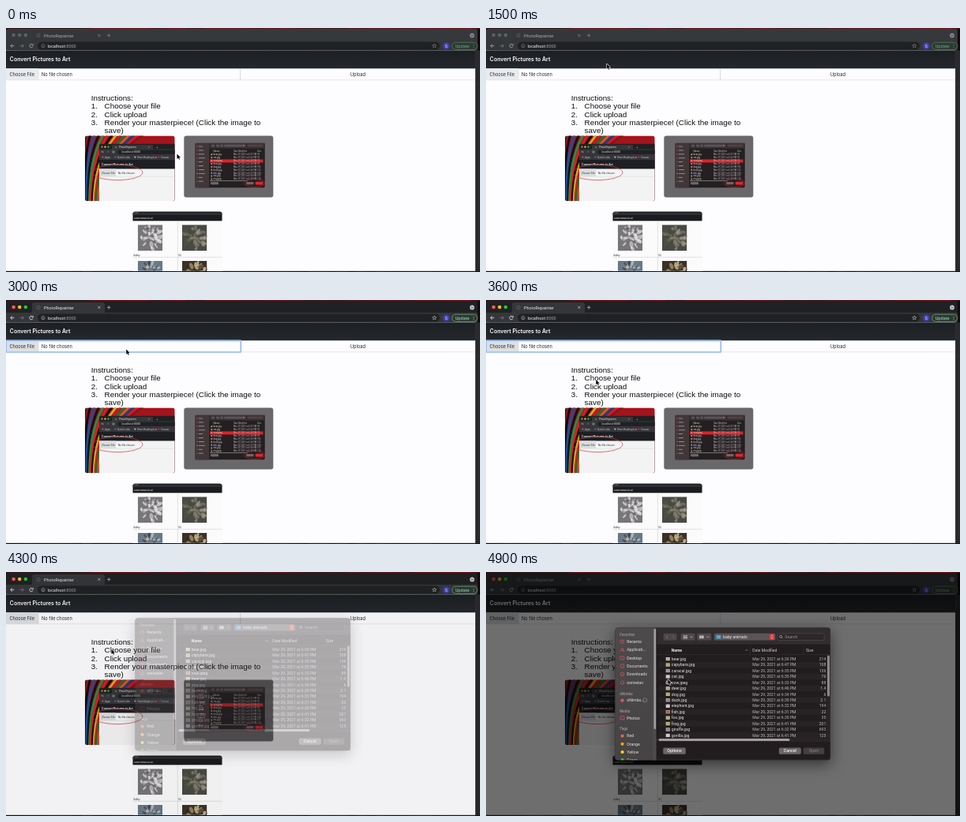
Animation of 600 by 309 pixels, one loop 5 s. Source, as an HTML page with a canvas:

```html
<!DOCTYPE html>
<html lang="en">
<head>
<meta charset="utf-8">
<title>Convert Pictures to Art</title>
<style>
html, body { margin: 0; width: 100%; height: 100%; overflow: hidden; background: #111; }
canvas { display: block; width: 600px; height: 309px; }
</style>
</head>
<body>
<canvas id="stage"></canvas>
<script>
const W = 600, H = 309, LOOP = 5000, STEP = 100;
const dpr = window.devicePixelRatio || 1;
const UI = 'Roboto, sans-serif', FORM = 'Inter, sans-serif';
const BODY = '"Liberation Sans", Arial, sans-serif';
const APP = 'PhotoRepainter';

function setup(canvas) {
  canvas.width = W * dpr;
  canvas.height = H * dpr;
  const c = canvas.getContext('2d');
  c.scale(dpr, dpr);
  return c;
}
const stage = document.getElementById('stage');
const screen = setup(stage);
const sheet = document.createElement('canvas');
const sheetCtx = setup(sheet);
let g = screen;

const lerp = (a, b, p) => a + (b - a) * p;
const smooth = p => p * p * (3 - 2 * p);

function rect(x, y, w, h, color) {
  g.fillStyle = color;
  g.fillRect(x, y, w, h);
}
function round(x, y, w, h, r, fill, stroke, lw = 0.6) {
  g.beginPath();
  g.roundRect(x, y, w, h, r);
  if (fill) { g.fillStyle = fill; g.fill(); }
  if (stroke) { g.strokeStyle = stroke; g.lineWidth = lw; g.stroke(); }
}
function disc(x, y, r, fill) {
  g.beginPath();
  g.arc(x, y, r, 0, 7);
  g.fillStyle = fill;
  g.fill();
}
function oval(x, y, rx, ry, color, lw = 0.6) {
  g.beginPath();
  g.ellipse(x, y, rx, ry, 0, 0, 7);
  g.strokeStyle = color;
  g.lineWidth = lw;
  g.stroke();
}
function line(color, lw, ...p) {
  g.beginPath();
  g.moveTo(p[0], p[1]);
  for (let i = 2; i < p.length; i += 2) g.lineTo(p[i], p[i + 1]);
  g.strokeStyle = color;
  g.lineWidth = lw;
  g.stroke();
}
function text(s, x, y, size, color, font = UI, weight = 400, align = 'left') {
  g.font = `${weight} ${size}px ${font}`;
  g.textAlign = align;
  g.fillStyle = color;
  g.fillText(s, x, y);
}
function clipped(x, y, w, h, r, draw) {
  g.save();
  g.beginPath();
  g.roundRect(x, y, w, h, r);
  g.clip();
  draw();
  g.restore();
}
function random(seed) {
  return () => (seed = (seed * 16807) % 2147483647) / 2147483647;
}
function gradient(y0, y1, a, b) {
  const f = g.createLinearGradient(0, y0, 0, y1);
  f.addColorStop(0, a);
  f.addColorStop(1, b);
  return f;
}

function desktopEdge() {
  rect(0, 0, W, H, '#17090b');
  const rnd = random(31);
  for (let x = 0; x < W; x += 12) {
    rect(x, 0, 12, 1.2, x < 90 ? '#32191c' : `rgb(${70 + rnd() * 50 | 0},24,30)`);
    rect(x, 308, 12, 1, `rgb(${25 + rnd() * 55 | 0},9,13)`);
  }
}

function browserBar(active, lit) {
  const ink = active ? '#e8eaed' : '#a4a7ab';
  const dim = active ? '#c4c7ca' : '#85888c';
  round(0, 1, 597, 20, 3, active ? '#202124' : '#36393c');
  rect(0, 16, 597, 12.6, '#35363a');
  round(33, 3, 92, 14, [3, 3, 0, 0], '#35363a');
  const lights = lit ? ['#fe5f57', '#febc2e', '#28c840'] : ['#5d6063', '#5d6063', '#5d6063'];
  lights.forEach((c, i) => disc(9.6 + i * 7.6, 9.1, 2.25, c));

  oval(41, 9.5, 2, 2, '#6d7074', 0.7);
  text(APP, 48, 11.5, 5.5, ink);
  line(dim, 0.7, 116.3, 7.8, 119.5, 11);
  line(dim, 0.7, 119.5, 7.8, 116.3, 11);
  line(dim, 0.7, 128, 9.4, 132.4, 9.4);
  line(dim, 0.7, 130.2, 7.2, 130.2, 11.6);
  disc(590, 9.5, 2.9, dim);
  line('#202124', 0.8, 588.6, 9, 590, 10.4, 591.4, 9);

  line(ink, 0.8, 10.5, 22.6, 5.8, 22.6);
  line(ink, 0.8, 8.1, 20.2, 5.7, 22.6, 8.1, 25);
  line('#777a7e', 0.8, 17.5, 22.6, 22.2, 22.6);
  line('#777a7e', 0.8, 19.9, 20.2, 22.3, 22.6, 19.9, 25);
  g.beginPath();
  g.arc(32, 22.6, 2.2, 0.3, 5.4);
  g.strokeStyle = ink;
  g.lineWidth = 0.8;
  g.stroke();
  line(ink, 0.8, 34.3, 19.9, 34.3, 21.8, 32.3, 21.8);

  round(40, 17.6, 509, 10, 5, '#202124');
  oval(47, 22.6, 2.1, 2.1, dim, 0.6);
  line(dim, 0.6, 47, 22.3, 47, 23.9);
  text('localhost', 52.5, 24.6, 5.5, '#f1f3f4');
  text(':8000', 52.5 + g.measureText('localhost').width, 24.6, 5.5, '#a2a6aa');
  g.beginPath();
  for (let i = 0; i < 10; i++) {
    const a = -Math.PI / 2 + i * Math.PI / 5, r = i % 2 ? 1.2 : 2.7;
    g.lineTo(542.3 + r * Math.cos(a), 22.6 + r * Math.sin(a));
  }
  g.closePath();
  g.strokeStyle = dim;
  g.lineWidth = 0.6;
  g.stroke();
  disc(557.3, 22.6, 4.3, '#3d42ae');
  text('S', 557.3, 24.5, 5.2, '#eef', UI, 400, 'center');
  const green = active ? '#7fcb96' : '#5c9a70';
  round(564.7, 18.2, 32, 9.2, 4.6, '#2d3833', green, 0.6);
  text('Update', 568.7, 24.7, 5.6, green, UI, 500);
  for (let i = -1; i < 2; i++) disc(592, 22.8 + i * 1.9, 0.5, green);
}

function wallpaper(x, y) {
  rect(x, y, 114, 83, '#a5141c');
  const paint = ['#0c0f12', '#15321f', '#0b0d10', '#1f4f9c', '#101214', '#2c8a45', '#d8211f', '#0f1113',
    '#d9a422', '#c8181f', '#23703c', '#e0561f', '#1d3f86', '#cf1c22', '#8e1219'];
  g.lineCap = 'round';
  paint.forEach((color, i) => {
    g.beginPath();
    g.moveTo(x - 4 + i * 1.9, y + 88);
    g.bezierCurveTo(x - 3 + i * 1.8, y + 55, x - 8 + i * 3, y + 25, x - 4 + i * 6, y - 6);
    g.strokeStyle = color;
    g.lineWidth = 3;
    g.stroke();
  });
  g.lineCap = 'butt';
}

function chooseShot() {
  clipped(100, 136.4, 113.5, 82.6, 3, () => {
    wallpaper(100, 136.4);
    round(118, 146.8, 110, 80, [2, 0, 0, 0], '#202124');
    ['#fe5f57', '#febc2e', '#28c840'].forEach((c, i) => disc(121.5 + i * 4, 150.6, 1.2, c));
    rect(134, 148, 52, 6, '#35363a');
    rect(118, 153.5, 100, 13.5, '#35363a');
    disc(139, 151, 1, '#777');
    text(APP, 143, 152.2, 3.2, '#ddd');
    text('×', 180, 152.2, 4, '#bbb');
    text('+', 190, 152.2, 4, '#bbb');
    line('#ddd', 0.5, 124, 157, 120.8, 157, 122, 155.8);
    line('#888', 0.5, 127, 157, 130.2, 157, 129, 155.8);
    oval(136, 157, 1.2, 1.2, '#ddd', 0.5);
    round(141, 154.4, 90, 5.4, 2.7, '#202124');
    text('localhost:8000', 146.5, 158.4, 3.6, '#ddd');
    [['Apps', 125], ['Quick Links', 141], ['Short Reading List', 166], ['Canvas', 196]].forEach(([s, x], i) => {
      disc(x - 2.6, 163.6, 1, ['#c66', '#48c', '#ccc', '#c33'][i]);
      text(s, x, 164.8, 3.1, '#c8c8c8');
    });
    rect(118, 167, 100, 11.4, '#1d1f22');
    text('Convert Pictures to Art', 121, 174.4, 3.6, '#fff', FORM, 600);
    rect(118, 178.4, 100, 45, '#f4f3f4');
    rect(118, 178.4, 21, 9.6, '#dcdee1');
    text('Choose File', 120.7, 184.5, 3.1, '#222', FORM);
    text('No file chosen', 142, 184.5, 3, '#222', FORM);
    line('#c9cdd1', 0.4, 118, 188.2, 214, 188.2);
    oval(141, 183, 32, 9.6, '#d8343a', 0.7);
  });
}

function pickShot() {
  clipped(225.3, 136.4, 113, 78, 3, () => {
    rect(225, 136, 114, 79, '#69676a');
    round(239, 145.6, 89, 57, 2, '#241f21', '#8a8789', 0.4);
    round(239.2, 145.8, 18, 56.6, [2, 0, 0, 2], '#413739');
    rect(257.2, 145.8, 70.6, 6.8, '#383133');
    round(276, 147.4, 27, 3, 1, '#5a5355');
    round(306, 147.4, 19, 3, 1, '#4a4345');
    disc(301, 148.9, 1.2, '#d23a40');
    [260, 266, 271].forEach(x => round(x, 147.4, 4, 3, 1, '#5a5355'));
    for (let i = 0; i < 10; i++) {
      disc(242, 150 + i * 4.9, 0.7, i === 7 ? '#e79a2d' : '#d5474c');
      rect(244, 149.6 + i * 4.9, 5 + i * 5 % 4, 0.8, '#a69fa1');
    }
    rect(258, 166.4, 67.5, 4, '#e02128');
    ['Name', 'bear.jpg', 'cat.jpg', 'cow.jpeg', 'deer.jpg', 'dog.jpg', 'duck.jpg', 'fish.jpg', 'fox.jpg', 'frog.jpg'].forEach((s, i) => {
      const y = 157.2 + i * 3.9;
      if (i) rect(259.5, y - 2, 1.6, 2.2, '#ad9c83');
      text(s, 262.5, y, 2.9, '#dedadb');
      text(i ? 'Mar 29, 2021 at 6:3' + i + ' PM' : 'Date Modified', 288, y, 2.7, '#b9b4b6');
      text(i ? 21 + i * 17 : 'Size', 318, y, 2.7, '#b9b4b6');
    });
    rect(258, 193, 48, 0.8, '#8c8789');
    round(259, 195, 10, 3.2, 1, '#6d6769');
    round(304, 195, 9.5, 3.2, 1, '#6d6769');
    round(315.6, 194.8, 9.8, 3.6, 1, '#e0262d');
    oval(314.5, 196.5, 13, 4.8, '#d02329', 0.6);
  });
}

// dark rim, light subject, blotchy paint strokes
function picture(x, y, w, h, rim, tones, seed) {
  clipped(x, y, w, h, 0, () => {
    rect(x, y, w, h, rim);
    const rnd = random(seed);
    g.globalAlpha = 0.75;
    for (let i = 0; i < 55; i++) {
      const a = rnd() * 7, d = Math.sqrt(rnd()) * 0.46;
      g.beginPath();
      g.ellipse(x + w / 2 + d * w * Math.cos(a), y + h / 2 + d * h * Math.sin(a),
        1 + rnd() * 3.2, 0.8 + rnd() * 1.6, a, 0, 7);
      g.fillStyle = tones[i % tones.length];
      g.fill();
    }
    g.globalAlpha = 1;
  });
}

function resultShot() {
  clipped(160.5, 232.5, 113, 75.3, [3, 3, 0, 0], () => {
    rect(160, 232, 114, 80, '#fbfbfc');
    rect(160, 232, 114, 12.3, '#1b1c1f');
    rect(160, 234.4, 114, 2, '#37383c');
    [163, 165, 167].forEach((x, i) => disc(x, 233.8, 0.6, ['#d55', '#cb4', '#4b5'][i]));
    text('Convert Pictures to Art', 162, 241.9, 2.2, '#ddd', FORM, 600);
    line('#c4c7ca', 0.5, 217.3, 244, 217.3, 309);
    line('#c4c7ca', 0.5, 160, 290.3, 274, 290.3);
    picture(166.8, 249.2, 31.4, 33, '#77757a', ['#e2e0e0', '#c9c7c7', '#69676a', '#f0eeee', '#a9a7a8'], 7);
    picture(223, 249.2, 31.4, 33, '#474a42', ['#8d8471', '#6b6f55', '#a39a8d', '#4d5348', '#77726f'], 19);
    text('Gallery', 161.5, 288.9, 2.6, '#222');
    text('Oil', 218.3, 288.9, 2.6, '#222');
    picture(166.8, 295, 31.4, 33, '#65798a', ['#c3ccd3', '#38424c', '#7b93a4', '#8b7a72'], 23);
    picture(223, 295, 31.4, 33, '#3a3127', ['#b59a68', '#2a2621', '#dac9a2', '#6b5640'], 41);
  });
}

function page(active, ring) {
  rect(0, 28.5, 594.3, 279.3, '#fdfcfe');
  rect(594.3, 28.5, 5.7, 279.3, '#292a2c');
  rect(0, 28.5, 594.3, 22.8, gradient(28.5, 51, '#1c1f23', '#24282c'));
  text('Convert Pictures to Art', 4.8, 41.8, 6.95, '#fff', FORM, 600);

  rect(0, 51.3, 41, 14.4, active ? '#dde0e3' : '#e9ecef');
  line('#ced4da', 0.5, 0, 65.8, 594, 65.8);
  line('#bfc4c9', 0.6, 296.6, 51.3, 296.6, 65.8);
  line('#d5d9dd', 0.5, 41.2, 51.3, 41.2, 65.8);
  text('Choose File', 4.5, 60.8, 5.65, '#212529', FORM);
  text('No file chosen', 45, 60.8, 5.7, '#212529', FORM);
  text('Upload', 445.3, 60.8, 5.7, '#212529', FORM, 400, 'center');
  if (ring === 1) {
    round(0.3, 51.6, 297, 14.4, 0.5, null, '#c1d8fb', 2);
    round(0.3, 51.6, 297, 14.4, 0.5, null, '#86b0ee', 0.8);
  } else if (ring) {
    line('#7ea6df', 0.9, 0, 65.8, 298, 65.8);
    line('#a9c6f0', 0.6, 297, 51.5, 297, 65.8);
  }

  const say = (s, x, row) => text(s, x, 92.4 + row * 10.05, 9.85, '#111', BODY);
  say('Instructions:', 107.7, 0);
  ['Choose your file', 'Click upload', 'Render your masterpiece! (Click the image to'].forEach((s, i) => {
    say(i + 1 + '.', 107.7, i + 1);
    say(s, 124.6, i + 1);
  });
  say('save)', 124.6, 4);
  chooseShot();
  pickShot();
  resultShot();
}

function sidebar() {
  const icon = '#e2555b', heads = '#9c9698', ink = '#e6e2e3';
  rect(163, 70, 53, 169, gradient(70, 238, '#4d4a4b', '#464344'));
  [['Favorites', 80.8], ['oNimbu', 156.2], ['Media', 178.3], ['Tags', 200]].forEach(([s, y]) =>
    text(s, 169.2, y, 4.7, heads, UI, 500));
  ['Recents', 'Applicati…', 'Desktop', 'Documents', 'Downloads', 'sorivelan'].forEach((s, i) => {
    const y = 88.2 + i * 10.3;
    if (i === 2) round(170, y - 1.8, 5, 3.6, 0.6, null, icon, 0.7);
    else if (i === 3) round(170.8, y - 2.3, 3.6, 4.6, 0.5, null, icon, 0.7);
    else if (i === 1) line(icon, 0.7, 170, y + 2, 172.5, y - 2.4, 175, y + 2, 171, y + 0.6);
    else if (i === 5) line(icon, 0.7, 170, y, 172.5, y - 2.3, 175, y, 174.2, y, 174.2, y + 2.3, 170.8, y + 2.3, 170.8, y);
    else oval(172.5, y, 2.3, 2.3, icon, 0.7);
    if (i === 0) line(icon, 0.6, 172.5, y - 1.4, 172.5, y, 173.6, y);
    if (i === 4) line(icon, 0.6, 171.5, y, 172.5, y + 1, 173.5, y);
    text(s, 178.2, y + 1.8, 5.2, ink);
  });
  disc(172.5, 162.6, 2.2, icon);
  text('oNimbu…', 178.2, 164.4, 5.2, ink);
  oval(201.3, 162.3, 2.5, 2.5, '#a39da0', 0.6);
  round(170, 182.8, 5, 4, 0.6, null, icon, 0.7);
  text('Photos', 178.2, 186.6, 5.2, ink);
  [['Red', '#ff5a52'], ['Orange', '#ff9f0a'], ['Yellow', '#ffd60a'], ['Green', '#32d74b']].forEach(([s, c], i) => {
    disc(172.6, 207.6 + i * 10.2, 2.1, c);
    text(s, 178.2, 209.4 + i * 10.2, 5.2, ink);
  });
  rect(211.2, 70, 4.8, 169, '#4f4b4d');
  round(212.4, 72, 2.7, 127, 1.3, '#a09b9d');
}

const files = 'bear capybara caracal cat cow deer dog duck elephant fish fox frog giraffe gorilla'.split(' ');
const minutes = [26, 47, 35, 35, 33, 46, 34, 39, 32, 31, 30, 41, 32, 41];
const sizes = '214 108 136 76 88 1.4 6 2.1 194 22 35 201 693 125'.split(' ');

function fileList() {
  text('Name', 234.8, 100.8, 5, '#f0edee', UI, 700);
  line('#bdb8ba', 0.6, 328.5, 99.8, 330, 98.3, 331.5, 99.8);
  text('Date Modified', 337.2, 100.8, 5, '#cfcacc');
  text('Size', 405, 100.8, 5, '#cfcacc');
  line('#3d3739', 0.5, 216, 104.6, 436, 104.6);
  line('#3d3739', 0.5, 334.5, 94, 334.5, 103);
  line('#3d3739', 0.5, 402, 94, 402, 103);
  const tones = ['#b9a98d', '#b5a94c', '#8d8790', '#d3c8c4', '#9c5a4e'];
  files.forEach((name, i) => {
    const y = 110 + i * 7.45;
    if (i % 2) rect(219, y - 3.7, 212, 7.45, '#272324');
    rect(227.7, y - 2, 5, 4.2, '#d7d2d0');
    rect(228.2, y - 1.5, 4, 3.2, tones[i % 5]);
    text(name + (i === 4 ? '.jpeg' : '.jpg'), 234.8, y + 1.8, 5.2, '#ebe7e8');
    text(`Mar 29, 2021 at 6:${minutes[i]} PM`, 337.2, y + 1.8, 5.1, '#bcb7b9');
    text(sizes[i], 430.3, y + 1.8, 5.1, '#bcb7b9', UI, 400, 'right');
  });
  rect(216, 210.2, 220, 5, '#292426');
  round(218.5, 211.1, 166, 3, 1.5, '#a29c9e');
  rect(431, 105, 5, 105, '#292426');
  round(432, 105.5, 3, 52, 1.5, '#8d8789');
}

function dialog() {
  g = sheetCtx;
  g.shadowColor = 'rgba(0,0,0,0.55)';
  g.shadowBlur = 18 * dpr;
  g.shadowOffsetY = 5 * dpr;
  round(163.5, 70.6, 272.5, 167.6, 3.5, '#211d1e');
  g.shadowColor = 'transparent';
  clipped(163.5, 70.6, 272.5, 167.6, 3.5, () => {
    sidebar();
    rect(216, 70, 220, 22.2, '#312c2e');
    line('#151213', 0.6, 216, 70, 216, 239);
    line('#1a1617', 0.6, 216, 92.2, 436, 92.2);
    round(224.6, 77.8, 17, 8.8, 1.6, '#4c4648');
    line('#8f898b', 0.7, 230, 80.2, 228.2, 82.2, 230, 84.2);
    line('#776f72', 0.7, 236.4, 80.2, 238.2, 82.2, 236.4, 84.2);
    [246.5, 267.3].forEach((x, k) => {
      round(x, 77.8, 18, 8.8, 1.6, '#4f494b');
      for (let i = 0; i < 3; i++) {
        if (k) rect(x + 3 + i * 1.9, 80.4, 1.4, 3.8, '#d8d3d5');
        else rect(x + 3, 80.4 + i * 1.6, 5.5, 0.8, '#d8d3d5');
      }
      line('#d8d3d5', 0.6, x + 12, 81.5, x + 13.5, 83, x + 15, 81.5);
    });
    round(288.7, 77.8, 77.5, 8.8, 1.8, '#5b5557');
    round(291.6, 80, 5.6, 4.6, 0.7, '#4ba9e4');
    text('baby animals', 300, 84.1, 5.2, '#f2eff0');
    round(358.9, 78.5, 6.2, 7.4, 1.4, '#e0383e');
    line('#fff', 0.6, 360.8, 81.4, 362, 80.1, 363.2, 81.4);
    line('#fff', 0.6, 360.8, 83, 362, 84.3, 363.2, 83);
    round(368.8, 77.8, 59.4, 8.8, 1.8, '#2c2729', '#5b5557', 0.5);
    oval(373.2, 81.8, 1.5, 1.5, '#c6c1c3', 0.6);
    line('#c6c1c3', 0.6, 374.3, 82.9, 375.6, 84.2);
    text('Search', 378.3, 84.1, 5.2, '#968f92');

    fileList();
    const button = (s, x, w, fill, ink) => {
      round(x, 222.4, w, 8.3, 1.8, fill);
      text(s, x + w / 2, 228.4, 5.3, ink, UI, 500, 'center');
    };
    button('Options', 224.2, 28.6, '#6b6567', '#f4f1f2');
    button('Cancel', 370.8, 28, '#6b6567', '#f4f1f2');
    button('Open', 401.6, 26.6, '#443e40', '#7d777a');
  });
  round(163.7, 70.8, 272.1, 167.2, 3.3, null, '#4b4648', 0.4);
  g = screen;
}

function pointer(x, y) {
  const shape = [0, 0, 0, 6.2, 1.5, 4.9, 2.5, 7.1, 3.5, 6.7, 2.5, 4.5, 4.5, 4.4];
  g.beginPath();
  for (let i = 0; i < shape.length; i += 2) g.lineTo(x + shape[i], y + shape[i + 1]);
  g.closePath();
  g.strokeStyle = '#f5f5f5';
  g.lineWidth = 1.1;
  g.lineJoin = 'round';
  g.stroke();
  g.fillStyle = '#000';
  g.fill();
}

// time, x, y of the pointer tip
const path = [[0, 216.5, 159.5], [600, 216.5, 159.5], [1400, 152.8, 45.5], [1800, 152.8, 45.5],
  [2400, 153, 60.3], [2900, 153, 60.3], [3600, 139.3, 101], [4200, 136, 110.5],
  [4400, 131, 85], [4900, 230.3, 136], [5000, 230.3, 136]];

function track(t) {
  const i = Math.max(1, path.findIndex(k => k[0] > t));
  const a = path[i - 1], b = path[i];
  const p = smooth((t - a[0]) / (b[0] - a[0]));
  return [lerp(a[1], b[1], p), lerp(a[2], b[2], p)];
}

function draw(t) {
  const active = t >= 2800;
  const p = Math.min(1, Math.max(0, (t - 4250) / 350));
  g.clearRect(0, 0, W, H);
  desktopEdge();
  browserBar(active && p < 1, active);
  page(active, active && !p ? (t < 3900 ? 1 : 0.5) : 0);
  if (p) {
    rect(0, 1, W, 307, `rgba(0,0,0,${0.56 * p ** 1.3})`);
    g.globalAlpha = 1 - (1 - p) ** 2.7;
    g.drawImage(sheet, 0, -14 * (1 - p), W, H);
    g.globalAlpha = 1;
  }
  pointer(...track(t));
}

dialog();
const start = performance.now();
let last = -1;
function tick() {
  const t = Math.floor(((performance.now() - start) % LOOP) / STEP) * STEP;
  if (t !== last) draw(last = t);
  requestAnimationFrame(tick);
}
tick();
</script>
</body>
</html>
```
